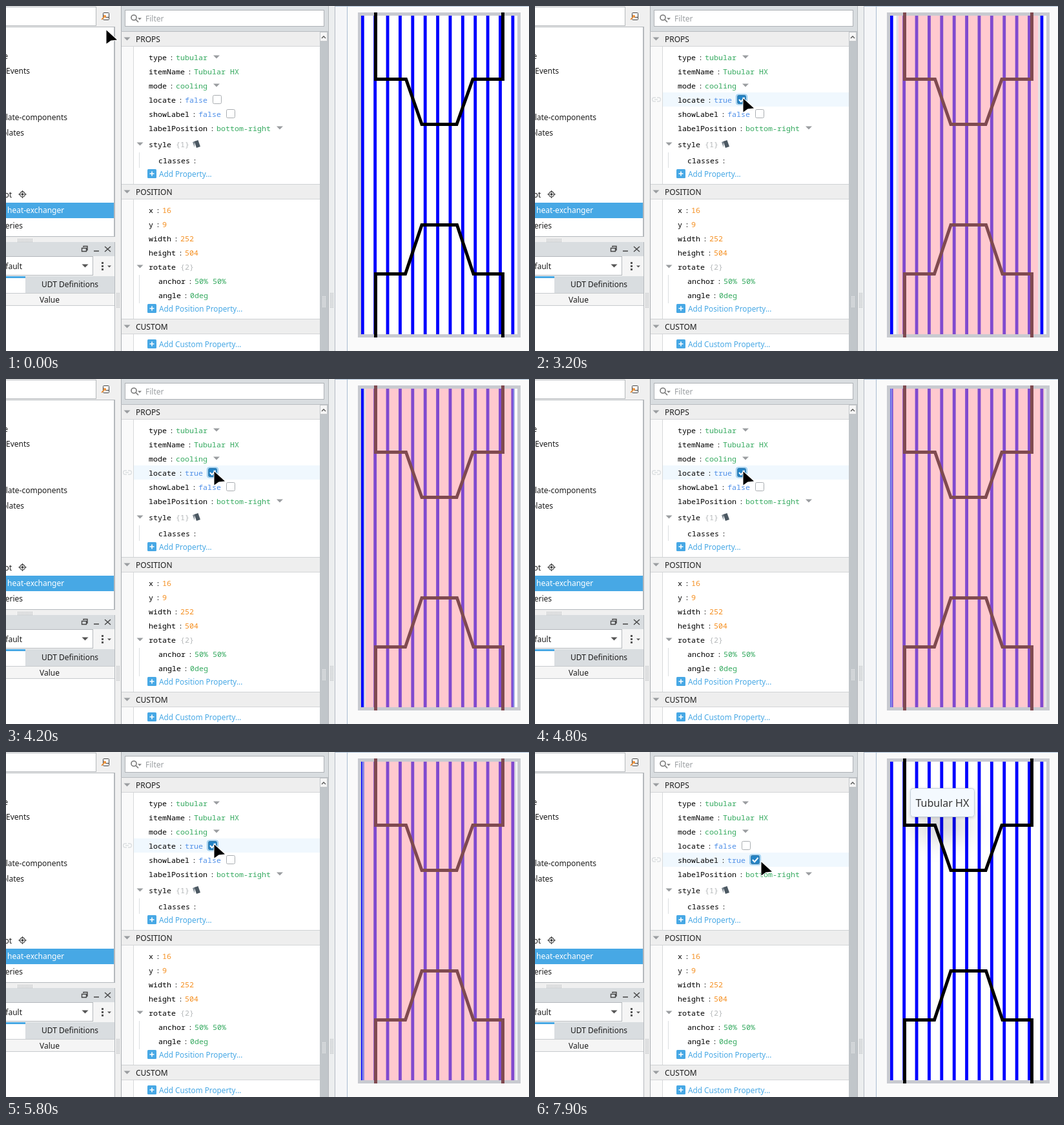
These frames come from a looping animation (810x535 px, 8000 ms). An HTML page with a canvas:

```html
<!DOCTYPE html>
<html lang="en">
<head>
<meta charset="utf-8">
<title>Heat exchanger properties</title>
<style>
html, body { margin: 0; width: 100%; height: 100%; overflow: hidden; }
canvas { display: block; }
</style>
</head>
<body>
<canvas id="stage" width="810" height="535"></canvas>
<script>
const c = document.getElementById('stage').getContext('2d');
const LOOP = 8000, CH = 7;
const SANS = '12px "Noto Sans", sans-serif', LINK = '11.75px "Noto Sans", sans-serif';
const MONO = '11.67px "Noto Sans Mono", monospace';
const INK = '#1c1c1c', GREY = '#9a9da0', BLUE = '#47a8e5', GREEN = '#36aa60', ORANGE = '#f58f20', BOOL = '#5090e8';
const BAR = '#d9dde0', PALE = '#f0f0f0', EDGE = '#b4b8bc';

const rect = (x, y, w, h, fill) => { c.fillStyle = fill; c.fillRect(x, y, w, h); };
const frame = (x, y, w, h, fill, edge) => { rect(x, y, w, h, edge); rect(x + 1, y + 1, w - 2, h - 2, fill); };

function round(x, y, w, h, r, fill, edge) {
  const inset = edge ? .5 : 0;
  c.beginPath();
  c.roundRect(x + inset, y + inset, w - 2 * inset, h - 2 * inset, r);
  if (fill) { c.fillStyle = fill; c.fill(); }
  if (edge) { c.strokeStyle = edge; c.lineWidth = 1; c.stroke(); }
}

function text(s, x, y, fill = INK, font = SANS, align = 'left') {
  c.font = font;
  c.textAlign = align;
  c.fillStyle = fill;
  c.fillText(s, x, y + 5);
}

function path(d, stroke, width, fill) {
  const p = new Path2D(d);
  if (stroke) { c.strokeStyle = stroke; c.lineWidth = width; c.stroke(p); }
  if (fill) { c.fillStyle = fill; c.fill(p); }
}

const caret = (x, y, r = 5, fill = GREY) => path(`M${x - r} ${y - r / 2}h${2 * r}l${-r} ${r}z`, null, 0, fill);

function grip(x, y, cols, rows, fill = '#a8acb0') {
  for (let i = 0; i < cols; i++)
    for (let j = 0; j < rows; j++) rect(x + i * 2, y + j * 2, 1, 1, fill);
}

function leftPanel() {
  rect(0, 0, 178, 535, PALE);
  frame(-2, 1, 142, 30, '#fff', EDGE);
  round(150, 10, 10, 12, 1, '#fff', '#444');
  path('M153 17.500h7', '#444', 1);
  path('M148 21l6-6m-3 0h3v3', '#ef8b2c', 1.6);
  frame(-2, 32, 170, 326, '#fff', EDGE);
  [['e', 3, 77], ['Events', 37, 100], ['plate-components', 95, 172], ['plates', 28, 196], ['root', 9, 292], ['series', 26, 340]]
    .forEach(([s, x, y]) => text(s, x, y, INK, SANS, 'right'));
  path('M29.5 292a4 4 0 1 1-8 0a4 4 0 1 1 8 0M25.5 286v3m0 6v3M19.5 292h3m6 0h3', '#444', 1.3);
  path('M27.500 292a2 2 0 1 1-4 0a2 2 0 1 1 4 0', null, 0, '#444');
  rect(0, 305, 167, 24, BLUE);
  text('heat-exchanger', 2, 316, '#fff');
  grip(18, 361, 12, 3);

  rect(0, 366, 169, 169, '#fff');
  rect(0, 366, 169, 22, BAR);
  path('M119.5 375.5h5v5h-7v-5zM120 374v-1.5h6v6h-1.5M136 380h8M153 373l9 8m0-8l-9 8', '#444', 1.4);
  rect(0, 388, 168, 32, '#f5f5f5');
  frame(-2, 388, 137, 30, '#fff', EDGE);
  text('default', 25, 403, INK, SANS, 'right');
  caret(122.5, 403, 5, '#555');
  [398, 403, 408].forEach(y => rect(148, y - 1, 3, 3, '#555'));
  caret(160, 404, 3, '#555');
  rect(0, 419, 30, 3, BLUE);
  rect(30, 419, 138, 26, BAR);
  text('UDT Definitions', 55, 431);
  frame(-2, 445, 171, 20, '#f5f5f5', '#c8cbce');
  text('Value', 52, 455);
  rect(168, 366, 1, 169, EDGE);
  rect(168, 32, 1, 326, EDGE);
  grip(171, 445, 3, 12);
}

function section(y, title) {
  rect(179, y - 11, 307, 23, '#eee');
  rect(179, y - 12, 307, 1, '#cfd2d4');
  rect(179, y + 11, 307, 1, '#d3d5d7');
  caret(187.5, y);
  text(title, 201, y);
}

// Returns the x where the value ends.
function prop(name, value, y, fill, x = 221) {
  const end = x + name.length * CH;
  text(name, x, y, '#000', MONO);
  text(':', end + 4, y, '#222', MONO);
  text(value, end + 14, y, fill, MONO);
  return end + 14 + value.length * CH;
}

function group(name, count, y, lines) {
  caret(207.5, y);
  text(name, 221, y, '#000', MONO);
  text(`{${count}}`, 228 + name.length * CH, y, '#b5b8ba', MONO);
  rect(206, y + 13, 1, lines, '#dcdee0');
}

function addLink(s, y) {
  round(219, y - 7, 14, 14, 1.5, BLUE);
  path(`M222.5 ${y}h7m-3.5-3.5v7`, '#fff', 1.6);
  text(s, 237, y, BLUE, LINK);
}

function checkbox(x, y, on, hot) {
  if (hot) round(x - 9, y - 8.5, 18, 17, 3, '#c5e4f8', '#8cc6ee');
  round(x - 7, y - 7, 14, 14, 2, on ? '#2483c5' : hot ? '#e8f1f8' : '#fff', hot ? '#3579a8' : '#a9adb1');
  if (on) path(`M${x - 4} ${y}l3 3.5l5.5-6.5`, '#fff', 2);
}

function middlePanel(s) {
  rect(178, 0, 322, 535, '#fff');
  rect(178, 0, 322, 39, BAR);
  frame(184, 6, 309, 26, '#fff', '#aeb2b6');
  path('M202 18a4 4 0 1 1-8 0a4 4 0 1 1 8 0M201 21l4 4', '#777', 1.6);
  caret(207, 20, 3, '#777');
  text('Filter', 216, 19, '#9b9fa2');
  rect(179, 40, 18, 495, '#fafafa');
  rect(197, 40, 1, 495, '#d6d8da');

  if (s.row) {
    rect(198, s.row - 11, 288, 22, '#f0f8fe');
    path(`M187 ${s.row - 3}h-2.500a3 3 0 0 0 0 6h2.500m2-6h2.500a3 3 0 0 1 0 6h-2.500m-4-3h5`, '#dcdfe1', 1.3);
  }

  section(51, 'PROPS');
  caret(prop('type', 'tubular', 79, GREEN) + 14, 79);
  prop('itemName', 'Tubular HX', 101, GREEN);
  caret(prop('mode', 'cooling', 123, GREEN) + 14, 123);
  [['locate', s.locate, 145], ['showLabel', s.label, 167]].forEach(([name, on, y]) => {
    const x = prop(name, String(on), y, BOOL) + 15;
    checkbox(x, y, on, Math.abs(s.x - x) < 10 && Math.abs(s.y - y) < 8);
  });
  caret(prop('labelPosition', 'bottom-right', 189, GREEN) + 14, 189);
  group('style', 1, 214, 24);
  path('M289 211l3-1v9z', null, 0, '#7a858e');
  path('M291.500 210l6-2l3.500 10l-6 2z', null, 0, '#4c5963');
  prop('classes', '', 239, GREEN, 236);
  addLink('Add Property...', 260);

  section(288, 'POSITION');
  [['x', 16], ['y', 9], ['width', 252], ['height', 504]]
    .forEach(([name, v], i) => prop(name, String(v), 316 + i * 22, ORANGE));
  group('rotate', 2, 404, 44);
  prop('anchor', '50% 50%', 426, GREEN, 236);
  prop('angle', '0deg', 448, GREEN, 236);
  addLink('Add Position Property...', 469);

  section(497, 'CUSTOM');
  addLink('Add Custom Property...', 524);

  rect(178, 0, 1, 535, '#a9adb1');
  rect(178, 39, 322, 1, '#b8bcc0');
  rect(486, 40, 13, 495, '#c1c6ca');
  frame(486, 40, 12, 15, '#f6f6f6', '#c3c6c9');
  path('M489 50l3-3l3 3', '#555', 1.3);
  grip(490, 450, 3, 9, '#fff');
}

function view(s) {
  rect(499, 0, 311, 535, '#fafafa');
  rect(499, 0, 11, 535, '#eceeef');
  rect(499, 0, 1, 535, EDGE);
  rect(509, 0, 1, 535, '#b4bac2');
  rect(510, 0, 18, 535, '#f5f6f8');
  rect(528, 0, 1, 535, '#a9bdd2');
  rect(510, 0, 300, 1, '#a9bdd2');
  grip(502, 445, 3, 12);
  rect(550, 15, 242, 494, '#fff');

  // Thirteen tubes, each a quarter of its share of the full width.
  const pitch = 252 / 13;
  for (let i = 0; i < 13; i++) rect(545 + pitch * (i + .25), 15, pitch / 4, 494, '#00f');
  path('M572.500 10V113.500H619.500L644 183.500H698L723 113.500H769.500V10', '#000', 5);
  path('M572.500 514V415.500H618.500L644 339.500H698.500L724 415.500H769.500V514', '#000', 5);

  if (s.locate) {
    const half = s.open ? s.half : 89.5, x = 671 - half;
    const edge = 'rgba(208,210,216,.65)';
    if (s.open) {
      rect(x + 3, 15, half * 2 - 6, 494, 'rgba(255,147,160,.5)');
      rect(x, 15, 3, 494, edge);
      rect(x + half * 2 - 3, 15, 3, 494, edge);
    } else rect(x, 259, half * 2, 6, edge);
  }

  c.strokeStyle = '#c8cad0';
  c.lineWidth = 5;
  c.strokeRect(547.5, 12.5, 247, 499);
  const cap = s.locate && s.open ? '#804a50' : '#000';
  [570, 767].forEach(x => [10, 509].forEach(y => rect(x, y, 5, 5, cap)));

  if (s.fade > 0) {
    c.save();
    c.globalAlpha = s.fade;
    c.shadowColor = 'rgba(0,0,0,.26)';
    c.shadowBlur = 40;
    c.shadowOffsetY = 32;
    round(594, 64, 74, 32, 4, '#f4f9fe');
    c.shadowColor = 'rgba(0,0,0,.16)';
    c.shadowBlur = 4;
    c.shadowOffsetY = 1;
    round(581, 56, 100, 45, 4, '#f4f9fe');
    c.shadowColor = 'transparent';
    round(581, 56, 100, 45, 4, null, '#c4d0da');
    text('Tubular HX', 589.5, 80, '#333', '16px "Noto Sans", sans-serif');
    c.restore();
  }
}

// Pointer stops: time, x, y
const STOPS = [[200, 155, 37], [1100, 354, 147], [1300, 350, 170], [1600, 321, 160], [2000, 320, 148],
  [2300, 322, 143], [6600, 322, 143], [7000, 351, 174], [7200, 350, 170], [LOOP, 350, 170]];

function pointerAt(t) {
  const i = STOPS.findIndex(p => p[0] > t);
  if (i < 1) return STOPS[0].slice(1);
  const [t0, x0, y0] = STOPS[i - 1], [t1, x1, y1] = STOPS[i];
  const k = (t - t0) / (t1 - t0);
  return [x0 + (x1 - x0) * k, y0 + (y1 - y0) * k];
}

function pointer(s) {
  const overValue = s.row === 167 && s.x > 298 && s.x < 333;
  c.save();
  c.translate(s.x, s.y);
  if (overValue) {
    const beam = 'M-4-8h3l1 1l1-1h3M0-7v14M-4 8h3l1-1l1 1h3';
    path(beam, '#fff', 4);
    path(beam, '#000', 2);
  } else path('M.5 .5V21.500L7.500 16.500L17 15.500Z', '#fff', 2, '#000');
  c.restore();
}

function draw(now) {
  const t = Math.floor(now % LOOP / 100) * 100;
  const [x, y] = pointerAt(t);
  const s = {
    x, y,
    row: x > 198 && x < 486 && y >= 68 && y < 200 ? 79 + Math.floor((y - 68) / 22) * 22 : 0,
    locate: t >= 3000 && t < 6100,
    open: t % 200 === 0,
    half: 123 - 5.8 * Math.abs(t - 5200) / 1000,
    label: t >= 7700,
    fade: Math.min(1, (t - 7600) / 300)
  };
  c.clearRect(0, 0, 810, 535);
  leftPanel();
  middlePanel(s);
  view(s);
  pointer(s);
}

function tick() {
  draw(performance.now());
  requestAnimationFrame(tick);
}
tick();
</script>
</body>
</html>
```
